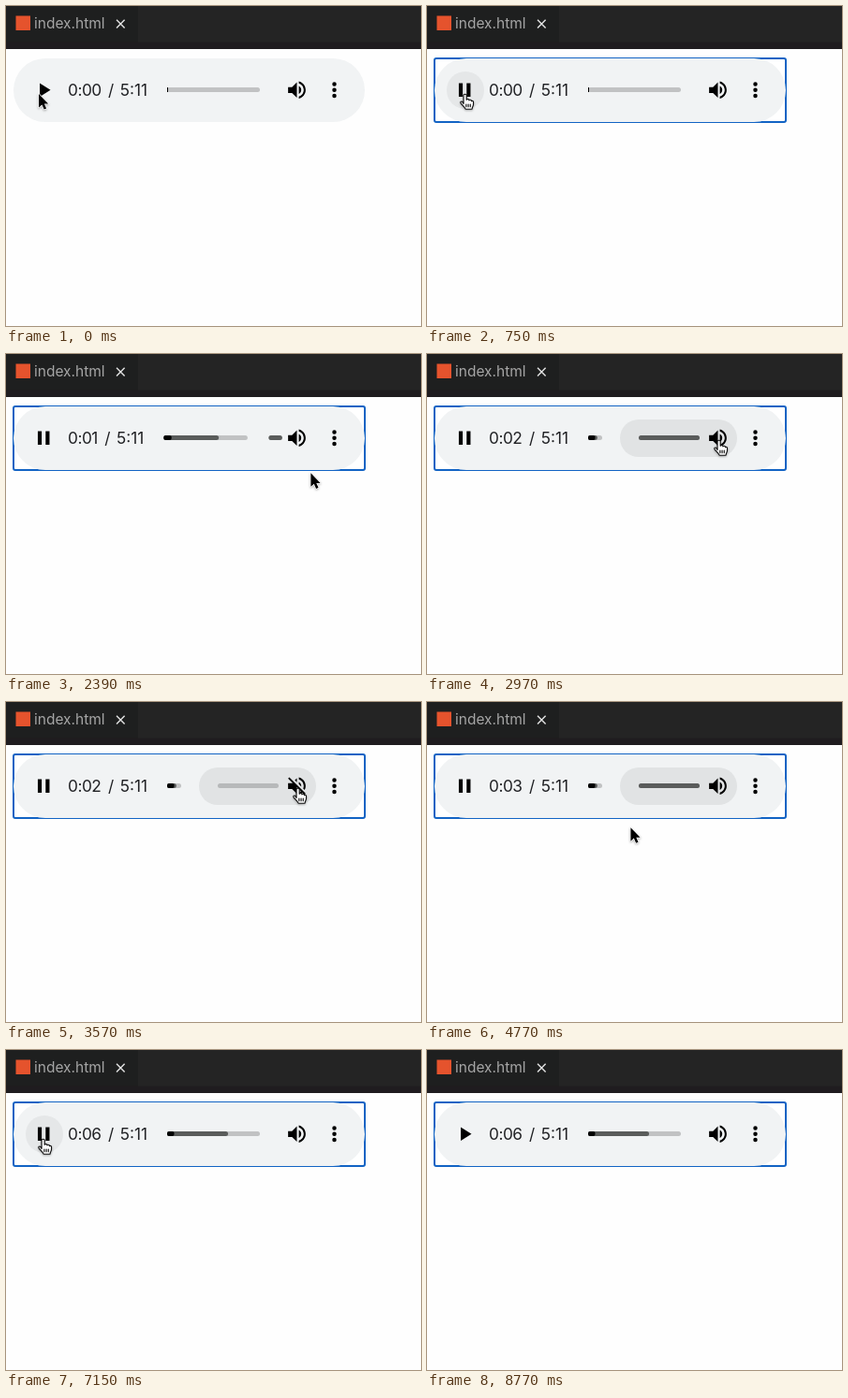
Recreate the animation shown at these times as an HTML page. Size 443 px wide and 342 px high, loop 9.22 s.

```html
<!DOCTYPE html>
<html lang="en">
<head>
<meta charset="utf-8">
<title>Audio player</title>
<style>
html, body { margin: 0; width: 100%; height: 100%; overflow: hidden; background: #fff; }
svg { display: block; width: 443px; height: 342px; }
text { font-family: Inter, "Liberation Sans", sans-serif; }
.time { font-size: 17.3px; fill: #202124; }
#now { letter-spacing: -.5px; }
#arrow, #hand { filter: drop-shadow(0 1px 1px rgba(0, 0, 0, .3)); }
</style>
</head>
<body>
<svg viewBox="0 0 443 342">
  <rect width="443" height="342" fill="#fefefe"/>
  <rect width="443" height="46" fill="#242424"/>
  <rect width="141" height="39" fill="#1e1f1f"/>
  <rect y="38.5" width="443" height="7.5" fill="#1f1c1f"/>
  <rect x="10.5" y="10.5" width="15.5" height="15.5" fill="#e5532d"/>
  <text x="30" y="24" font-size="15.5" fill="#a6a6a6">index.html</text>
  <path d="M118 14.8l8.6 8.6m0-8.6l-8.6 8.6" stroke="#e4e4e4" stroke-width="1.4"/>

  <rect id="focus" x="8" y="56" width="375" height="68" rx="2" fill="#fff" stroke="#1263c4" stroke-width="2"/>
  <rect x="8" y="56" width="375" height="68" rx="34" fill="#f1f3f4"/>
  <circle id="hover" cx="41" cy="90" r="20" fill="#e5e7e8"/>
  <path id="play" d="M8 5v14l11-7z" transform="translate(27.7 77.25) scale(1.042)"/>
  <path id="pause" d="M6 19h4V5H6zM14 5v14h4V5z" transform="translate(27.7 77.25) scale(1.042)"/>

  <text id="now" class="time" x="66" y="96"></text>
  <g id="total" class="time">
    <text x="109" y="96">/</text>
    <text x="121.7" y="96">5:11</text>
  </g>

  <rect id="track" y="87" height="5" rx="2.5" fill="#c1c2c3"/>
  <rect id="buffer" y="87" height="5" rx="2.5" fill="#5a5c5b"/>
  <rect id="played" y="87" height="5"/>

  <rect id="pill" y="70" height="40" rx="20" fill="#e1e3e4"/>
  <rect id="volTrack" y="87" height="5" rx="2.5" fill="#b7b9ba"/>
  <rect id="volLevel" y="87" height="5" rx="2.5" fill="#5a5c5b"/>
  <path id="speaker" transform="translate(298 77.25) scale(1.042)" d="M3 9v6h4l5 5V4L7 9H3zm13.5 3c0-1.77-1.02-3.29-2.5-4.03v8.05c1.48-.73 2.5-2.25 2.5-4.02zM14 3.23v2.06c2.89.86 5 3.54 5 6.71s-2.11 5.85-5 6.71v2.06c4.01-.91 7-4.49 7-8.77s-2.99-7.86-7-8.77z"/>
  <path id="muted" transform="translate(298 77.25) scale(1.042)" d="M16.5 12c0-1.77-1.02-3.29-2.5-4.03v2.21l2.45 2.45c.03-.2.05-.41.05-.63zm2.5 0c0 .94-.2 1.82-.54 2.64l1.51 1.51C20.63 14.91 21 13.5 21 12c0-4.28-2.99-7.86-7-8.77v2.06c2.89.86 5 3.54 5 6.71zM4.27 3L3 4.27 7.73 9H3v6h4l5 5v-6.73l4.25 4.25c-.67.52-1.42.93-2.25 1.18v2.06c1.38-.31 2.63-.95 3.69-1.81L19.73 21 21 19.73l-9-9L4.27 3zM12 4L9.91 6.09 12 8.18V4z"/>
  <path d="M350.5 83.5v0m0 6.25v0m0 6.25v0" stroke="#000" stroke-width="4.5" stroke-linecap="round"/>

  <path id="arrow" d="M0 0V14.5L3.4 11.4 5.7 16.6 8.1 15.5 5.9 10.6H10.2Z" stroke="#fff" stroke-width="1.4" stroke-linejoin="round" paint-order="stroke"/>
  <g id="hand">
    <g transform="translate(-.4 -.8) scale(1.05 .94)" stroke="#111" stroke-width="1.1" stroke-linejoin="round" stroke-linecap="round">
      <path fill="#fff" d="M-1.5 11V1.5a1.5 1.5 0 0 1 3 0V6.5c.3-1.2 2.3-1.2 2.6 0V7.1c.4-1 2.2-.9 2.4.3V8.1c.5-.8 2-.5 2 .8V11.5c0 2-1.2 3-1.4 5.5H.5C-.1 15-2.5 13-4.3 10.3-5.3 8.7-3.5 7.7-2.5 9Z"/>
      <path fill="none" d="M1.2 11.5v3M3.3 11.5v3M5.4 11.5v3"/>
    </g>
  </g>
</svg>
<script>
const LOOP = 9220, STEPS = 62;
const el = {};
document.querySelectorAll('[id]').forEach(e => el[e.id] = e);

const within = (s, a, b) => s >= a && s < b;
const ramp = (s, a, b) => Math.min(1, Math.max(0, (s - a) / (b - a)));
const smooth = u => u * u * (3 - 2 * u);
const show = (e, on) => e.setAttribute('visibility', on ? 'visible' : 'hidden');

function bar(e, x, width) {
  e.setAttribute('x', x);
  e.setAttribute('width', Math.max(0, width));
}

function pointer(s) {
  if (s < 1) return [35, 94];
  if (s < 10) return [41, 95];
  if (s < 11) return [290, 137.5];
  if (s < 30) {                       // up to the speaker
    const u = smooth(ramp(s, 14, 18.2));
    return [337 - 25 * u, 157 - 64 * u];
  }
  if (s < 55) {                       // swing below the player, back to the button
    const u = ramp(s, 30, 39);
    return [40 + 272 * (1 - u) ** 1.7, 93 + 3 * u + 98 * Math.sin(Math.PI * u) ** 2];
  }
  const d = Math.max(0, s - 56);      // off the bottom edge
  return [418 + 4 * d, 252 + 32 * d];
}

function draw(time) {
  const s = Math.floor((time + 5) * STEPS / LOOP);
  const playing = within(s, 5, 52);

  show(el.focus, s >= 5);
  show(el.hover, within(s, 1, 11) || within(s, 39, 56));
  show(el.pause, playing);
  show(el.play, !playing);

  const sec = Math.min(6, Math.max(0, Math.floor((s - 6) / 7)));
  const shift = sec === 1 ? -3.7 : 0;   // "1" is a narrow digit
  el.now.textContent = '0:0' + sec;
  el.total.setAttribute('transform', `translate(${shift})`);

  const open = smooth(ramp(s, 15, 19)) - smooth(ramp(s, 32, 35));
  const left = 172 + shift;
  const width = 271 - 84 * open - left;
  const begun = s >= 6;
  bar(el.track, left, width);
  bar(el.buffer, left, width * .657 * ramp(s, 5, 7));
  bar(el.played, left, begun ? 7.5 - shift / 4 : 1);
  el.played.setAttribute('rx', begun ? 2 : 0);

  const volLeft = 290.5 - 64.5 * open;
  const volWidth = open > 0 ? 5 + 60 * open : 0;
  const level = 1 - ramp(s, 22, 24) + ramp(s, 27, 29);
  bar(el.volTrack, volLeft, volWidth);
  bar(el.volLevel, volLeft, volWidth * level);
  bar(el.pill, volLeft - 20, 351 - volLeft);
  el.pill.setAttribute('opacity', ramp(open, .17, 1));
  const silent = within(s, 23, 29);
  show(el.muted, silent);
  show(el.speaker, !silent);

  const hand = within(s, 1, 10) || within(s, 18, 31) || within(s, 39, 55);
  const [x, y] = pointer(s);
  for (const e of [el.hand, el.arrow]) e.setAttribute('transform', `translate(${x} ${y})`);
  show(el.hand, hand);
  show(el.arrow, !hand);
}

const start = performance.now();
function frame() {
  draw((performance.now() - start) % LOOP);
  requestAnimationFrame(frame);
}
frame();
</script>
</body>
</html>
```
